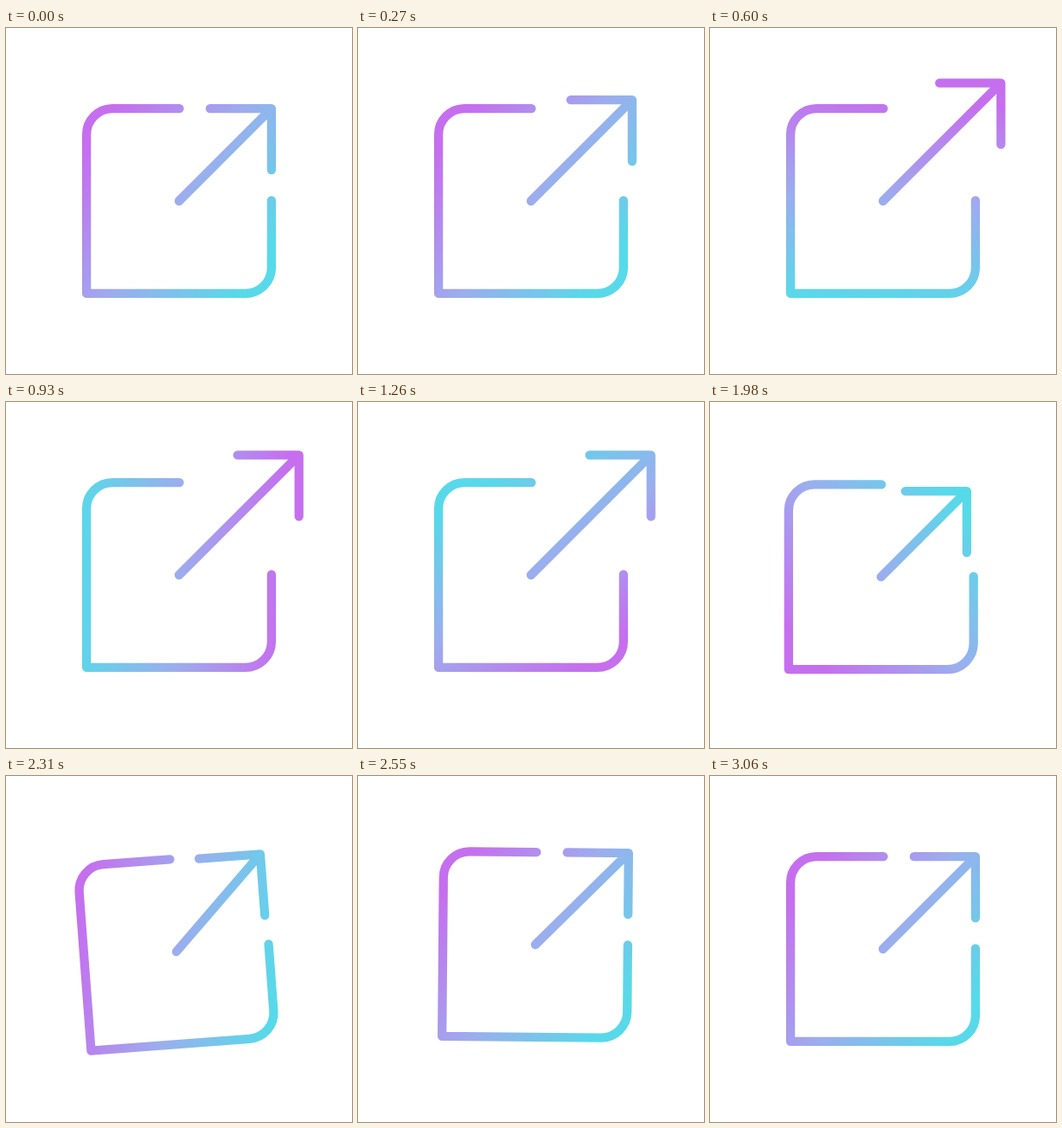
These frames come from a looping animation (400 by 400 pixels, 8000 ms). An HTML page:

```html
<!DOCTYPE html>
<html lang="en">
<head>
<meta charset="utf-8">
<title>Open link icon</title>
<style>
  html, body { margin: 0; width: 100%; height: 100%; overflow: hidden; background: #fff; }
  svg { display: block; width: 100vw; height: 100vh; }
</style>
</head>
<body>
<svg viewBox="0 0 400 400">
  <defs>
    <linearGradient id="tint" gradientUnits="userSpaceOnUse">
      <stop offset="0" stop-color="#c56fee"/>
      <stop offset="0.5" stop-color="#9cadee"/>
      <stop offset="1" stop-color="#58d9e9"/>
    </linearGradient>
  </defs>
  <g id="icon" fill="none" stroke="url(#tint)" stroke-width="10.3" stroke-linecap="round" stroke-linejoin="round">
    <path d="M200.5 93.1H123.1A30 30 0 0 0 93.1 123.1V306.9H276.9A30 30 0 0 0 306.9 276.9V199.5"/>
    <path id="arrow"/>
  </g>
</svg>
<script>
const LOOP = 8000, ACTIVE = 3060, STEP = 30;
const C = 200, HALF = 106.9, HEAD = 71, REACH = 120;
const el = id => document.getElementById(id);
const icon = el('icon'), arrow = el('arrow'), tint = el('tint');

// 0 before a, 1 after b, smooth in between
function ease(t, a, b) {
  const u = Math.min(1, Math.max(0, (t - a) / (b - a)));
  return u * u * (3 - 2 * u);
}

// The arrow flies out, snaps back past its rest place and settles
const pull = t => 31.8 * ease(t, 0, 720) - 39.6 * ease(t, 1290, 1980) + 7.8 * ease(t, 1980, 2460);
// The snap pushes the whole icon down-left; it rebounds, then rests
const shift = t => -3 * ease(t, 1860, 2040) + 8 * ease(t, 2310, 2550) - 5 * ease(t, 2550, 2850);
const tilt = t => -4.3 * ease(t, 1980, 2310) + 4.8 * ease(t, 2310, 2550) - 0.5 * ease(t, 2550, 2850);
// The gradient makes one full turn in two sweeps
const hue = t => -145 + 200 * ease(t, 200, 1300) + 160 * ease(t, 1300, 2600);

function draw(t) {
  const p = pull(t), s = shift(t), a = hue(t) * Math.PI / 180;
  const x = C + HALF + p, y = C - HALF - p;
  arrow.setAttribute('d', `M${C} ${C}L${x} ${y}M${x - HEAD} ${y}H${x}V${y + HEAD}`);
  icon.setAttribute('transform', `translate(${s} ${-s}) rotate(${tilt(t)} ${C} ${C})`);
  const dx = REACH * Math.cos(a), dy = REACH * Math.sin(a);
  const ends = { x1: C + dx, y1: C + dy, x2: C - dx, y2: C - dy };
  for (const k in ends) tint.setAttribute(k, ends[k]);
}

function tick() {
  const t = performance.now() % LOOP;
  draw(Math.min(ACTIVE, Math.floor(t / STEP) * STEP));
  requestAnimationFrame(tick);
}
tick();
</script>
</body>
</html>
```
